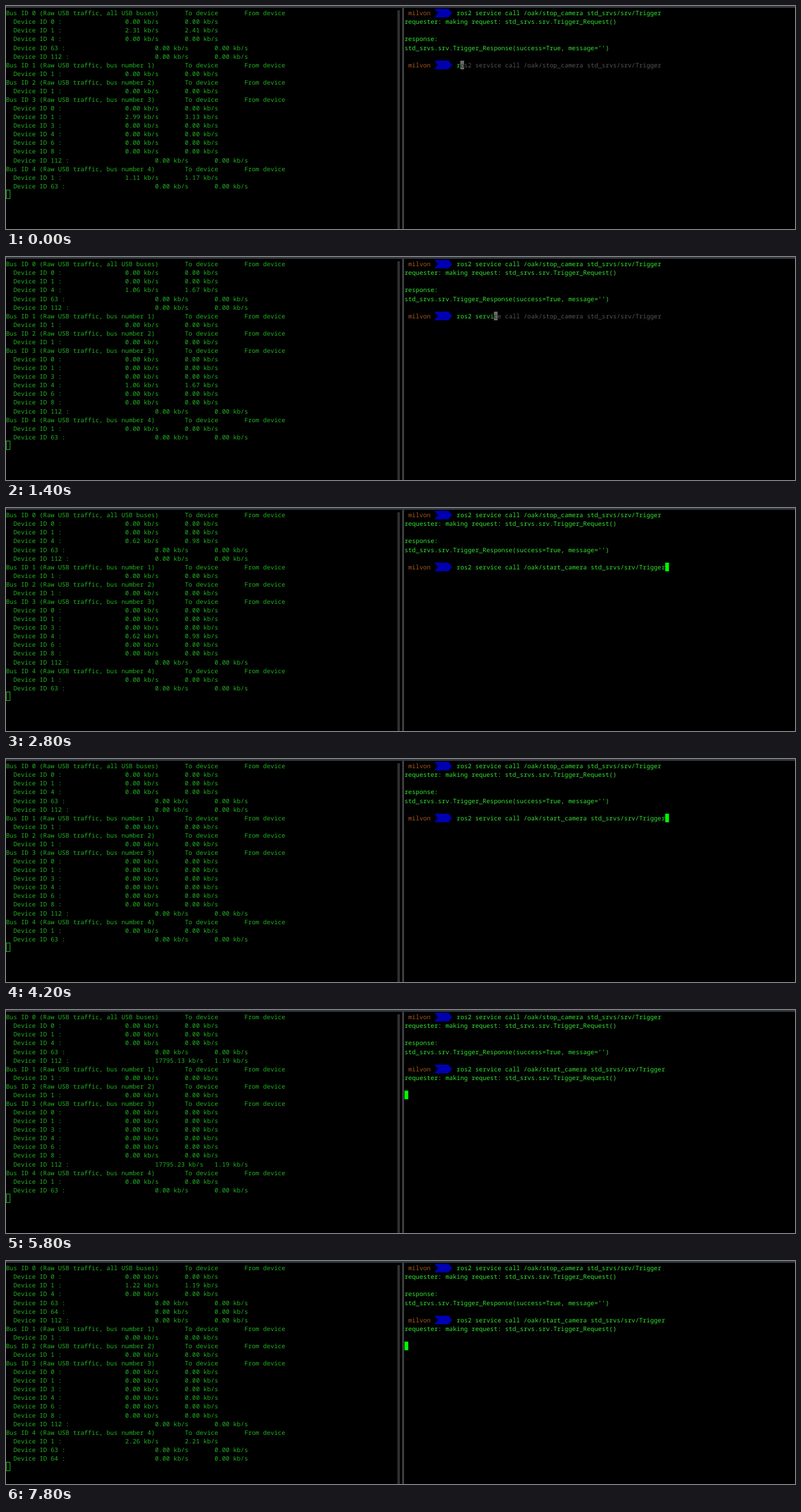
Animation of 1280x363 px, one loop 8 s. Source, as an HTML page with a canvas:

```html
<!DOCTYPE html>
<html lang="en">
<head>
<meta charset="utf-8">
<title>USB traffic monitor</title>
<style>
html, body { margin: 0; height: 100%; overflow: hidden; background: #000; }
canvas { display: block; }
</style>
</head>
<body>
<canvas id="stage" width="1280" height="363"></canvas>
<script>
const ctx = document.getElementById('stage').getContext('2d');
const CELL = 6.042, ROW = 14.08, TOP = 4.5, RIGHT = 646.5, LOOP = 8000, STEP = 200;
const GREEN = '#22b022', BRIGHT = '#34e334', GREY = '#555', CURSOR = '#0f0';
const COMMAND = name => `ros2 service call /oak/${name}_camera std_srvs/srv/Trigger`;
const REQUEST = 'requester: making request: std_srvs.srv.Trigger_Request()';

// Characters typed at each step before the history search fills the line
const TYPED = [1, 2, 3, 4, 5, 6, 8, 10, 12, 13, 13, 14, 14, 14];

// Monitor refreshes: start time and the non-zero rates as "bus:device"
const same = (device, bus, rate) => ({ ['0:' + device]: rate, [bus + ':' + device]: rate });
const REFRESH = [
  [0, { '0:1': ['2.31', '2.41'], '3:1': ['2.99', '3.13'], '4:1': ['1.11', '1.17'] }],
  [600, {}],
  [1200, same(4, 3, ['1.06', '1.67'])],
  [1800, same(4, 3, ['2.12', '3.34'])],
  [2400, same(4, 3, ['0.62', '0.98'])],
  [3000, same(4, 3, ['0.51', '0.81'])],
  [4200, {}],
  [4800, same(112, 3, ['1.12', '1.36'])],
  [5400, { '0:112': ['17795.13', '1.19'], '3:112': ['17795.23', '1.19'] }],
  [6000, same(112, 3, ['0.00', '1.17'])],
  [6600, same(112, 3, ['0.00', '1.15'])],
  [7200, { ...same(112, 3, ['0.00', '1.15']), '0:1': ['0.90', '0.94'] }],
  [7800, { '0:1': ['1.22', '1.19'], '4:1': ['2.26', '2.21'] }]
];
// Cursor is hidden inside these intervals
const HIDDEN = [[3600, 4200], [4600, 4800], [5400, 5800], [6200, 6800], [7200, 7800]];

function text(str, col, row, color, left = 0) {
  ctx.fillStyle = color;
  ctx.fillText(str, left + col * CELL, TOP + row * ROW + 10.7);
}

function rect(x, y, w, h, color) {
  ctx.fillStyle = color;
  ctx.fillRect(x, y, w, h);
}

function block(col, row, color) {
  rect(RIGHT + col * CELL, TOP + row * ROW, CELL, ROW, color);
}

function drawMonitor(t) {
  const rates = REFRESH.findLast(([start]) => start <= t)[1];
  const extra = t >= 7800 ? [64] : [];
  const buses = [
    [0, 1, 4, 63, ...extra, 112], [1], [1], [0, 1, 3, 4, 6, 8, 112], [1, 63, ...extra]
  ];
  let row = 0;
  buses.forEach((devices, bus) => {
    text(`Bus ID ${bus} (Raw USB traffic, ${bus ? 'bus number ' + bus : 'all USB buses'})`, 0, row, GREEN);
    text('To device', 48, row, GREEN);
    text('From device', 64, row++, GREEN);
    for (const device of devices) {
      const [to, from] = rates[bus + ':' + device] || ['0.00', '0.00'];
      const col = device > 9 ? 40 : 32;
      text(`Device ID ${device} :`, 2, row, GREEN);
      text(to + ' kb/s', col, row, GREEN);
      text(from + ' kb/s', col + 16, row++, GREEN);
    }
  });
  ctx.strokeStyle = GREEN;
  ctx.strokeRect(0.5, Math.round(TOP + row * ROW) - 0.5, 6, 14);
}

function drawPrompt(row) {
  const x = RIGHT + 8 * CELL, y = TOP + row * ROW, end = x + 4.8 * CELL;
  text('milvon', 1, row, '#a9561c', RIGHT);
  ctx.fillStyle = '#0000b2';
  ctx.beginPath();
  ctx.moveTo(x, y);
  ctx.lineTo(end - CELL, y);
  ctx.lineTo(end, y + ROW / 2);
  ctx.lineTo(end - CELL, y + ROW);
  ctx.lineTo(x, y + ROW);
  ctx.lineTo(x + CELL, y + ROW / 2);
  ctx.fill();
}

function drawShell(t) {
  const line = (str, row, col = 0) => text(str, col, row, BRIGHT, RIGHT);
  const stop = COMMAND('stop'), start = COMMAND('start');
  const cursorOn = !HIDDEN.some(([a, b]) => t >= a && t < b);
  drawPrompt(0);
  line(stop, 0, 14);
  line(REQUEST, 1);
  line('response:', 3);
  line("std_srvs.srv.Trigger_Response(success=True, message='')", 4);
  drawPrompt(6);

  if (t < 2800) {
    const n = TYPED[t / STEP];
    line(stop.slice(0, n), 6, 14);
    text(stop.slice(n + 1), 15 + n, 6, GREY, RIGHT);
    block(14 + n, 6, '#6c6c6c');
    text(stop[n], 14 + n, 6, '#222', RIGHT);
    return;
  }
  line(start, 6, 14);
  if (t >= 5000) line(REQUEST, 7);
  if (!cursorOn) return;
  if (t < 4400) block(14 + start.length, 6, CURSOR);
  else block(0, t < 5000 ? 7 : 9, CURSOR);
}

function draw(now) {
  const t = Math.floor((now % LOOP) / STEP) * STEP;
  rect(0, 0, 1280, 363, '#000');
  rect(0, 0, 1280, 3, '#31373b');
  rect(635, 7, 4, 356, '#303030');
  rect(643, 3, 2.5, 360, '#484c4f');
  ctx.font = '10.07px "Noto Sans Mono", monospace';
  ctx.textRendering = 'geometricPrecision';
  drawMonitor(t);
  drawShell(t);
  requestAnimationFrame(() => draw(performance.now() - began));
}

const began = performance.now();
draw(0);
</script>
</body>
</html>
```
